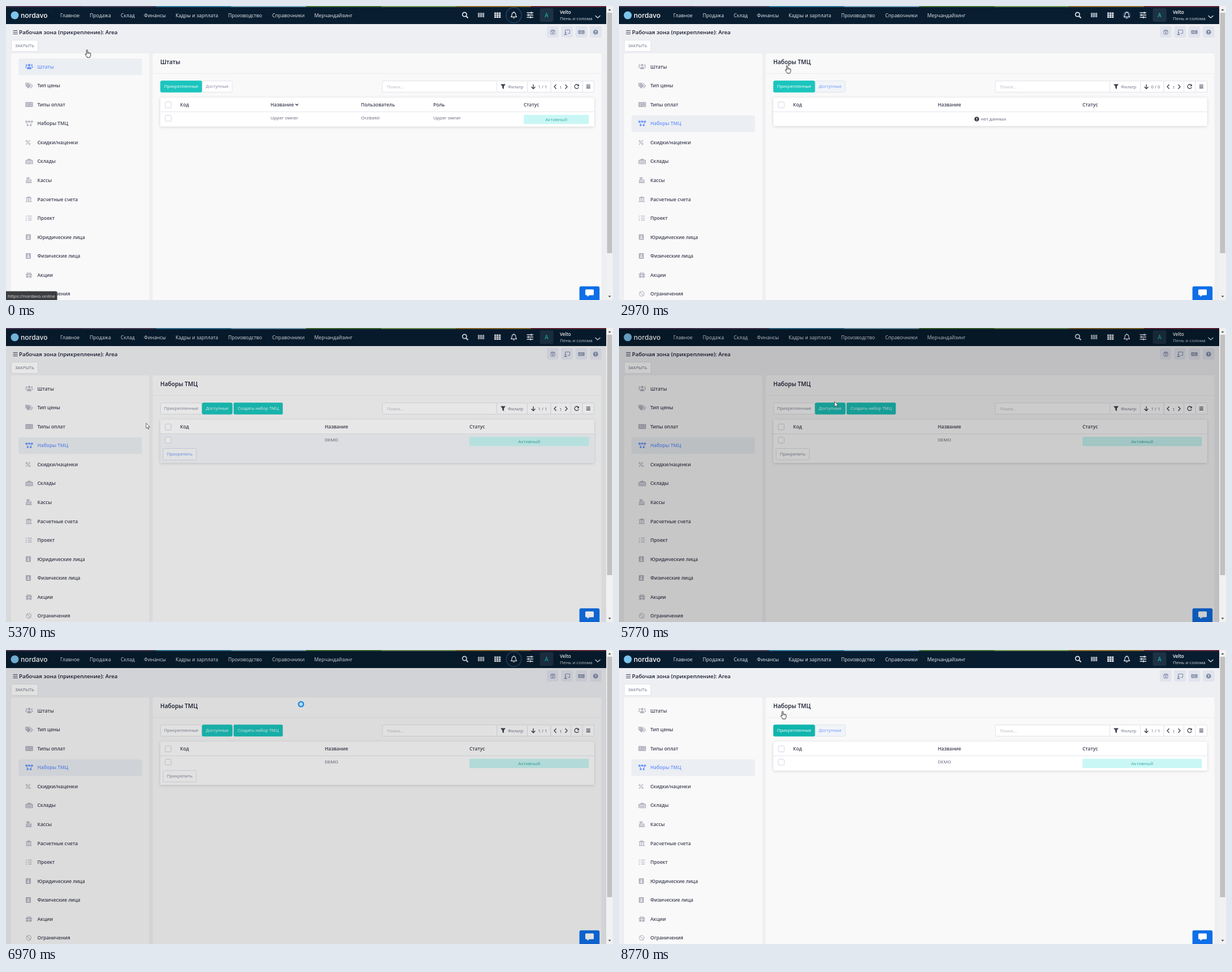
An HTML page for the animation above (8.81 s loop, 1074 by 521 pixels).

```html
<!DOCTYPE html>
<html lang="ru">
<head>
<meta charset="utf-8">
<style>
html, body { margin: 0; width: 100%; height: 100%; overflow: hidden; background: #eeeff2; }
svg { display: block; width: 1074px; height: 521px; }
text { font-family: "Open Sans", "Noto Sans", sans-serif; white-space: pre; }
</style>
</head>
<body>
<svg id="stage" viewBox="0 0 1074 521"></svg>
<script>
const LOOP = 8810;
const INK = '#3f4254', GREY = '#7e8299', BLUE = '#6993ff', TEAL = '#1bc5bd', LINE = '#e0e2e8';

const T = (x, y, s, size, fill = INK, weight = 400, anchor = 'start') =>
  `<text x="${x}" y="${y}" font-size="${size}" fill="${fill}" font-weight="${weight}" text-anchor="${anchor}">${s}</text>`;
const R = (x, y, w, h, fill, r = 0, stroke = 'none') =>
  `<rect x="${x}" y="${y}" width="${w}" height="${h}" rx="${r}" fill="${fill}" stroke="${stroke}"/>`;
const P = (d, fill = 'none', stroke = 'none', w = 1) =>
  `<path d="${d}" fill="${fill}" stroke="${stroke}" stroke-width="${w}" stroke-linejoin="round"/>`;
const C = (x, y, r, fill, stroke = 'none', w = 1) =>
  `<circle cx="${x}" cy="${y}" r="${r}" fill="${fill}" stroke="${stroke}" stroke-width="${w}"/>`;
const G = (x, y, body, color = INK) => `<g transform="translate(${x} ${y})" color="${color}">${body}</g>`;
const K = 'currentColor', PALE = '#f9f9f9';

const people = C(0, -2.7, 2.2, K) + C(-4.7, -2.6, 1.4, K) + C(4.7, -2.6, 1.4, K) +
  P('M-3.8 4.6V3Q-3.8.4-1.3.4H1.3Q3.8.4 3.8 3V4.6ZM-6.7 2V.9Q-6.7-.4-5.3-.4H-3.6Q-4.7.5-4.8 2ZM6.7 2V.9Q6.7-.4 5.3-.4H3.6Q4.7.5 4.8 2Z', K);
const book = R(-4.5, -5, 9, 10, K, 1) + C(0, -1.5, 1.3, PALE) + P('M-2.4 2.8Q-2.2.5 0 .5T2.4 2.8Z', PALE);

const items = [
  ['Штаты', people],
  ['Тип цены', P('M-6.8-4.4V0L-2.2 4.8Q-1.6 5.2-1 4.8L3 .8Q3.4.2 3 -.4L-1.6-5H-6.2ZM0-5H1.3L6.4 0Q7 .6 6.4 1.2L2.6 5 1.4 4.3 4.6.9Q5 .2 4.6-.4Z', K) + C(-4.4, -2.6, .9, PALE)],
  ['Типы оплат', R(-6.7, -4.3, 13.4, 8.8, K, 1) + P('M-4.5-1.5H-2M-4.5 1H-2M-.2 1.8H1.2M2.5 1.8H5M-.2-1.5H1.2M3-1.5H5', 'none', PALE, .8)],
  ['Наборы ТМЦ', P('M-4-3.4H4M-4.6-2L-1.6 3M4.6-2L1.6 3', 'none', K, 1) + R(-6.6, -4.8, 3.2, 3.2, K, .5) + R(-1.6, -4.8, 3.2, 3.2, K, .5) + R(3.4, -4.8, 3.2, 3.2, K, .5) + R(-4.2, 1.6, 3, 3, K, .5) + R(1.2, 1.6, 3, 3, K, .5)],
  ['Скидки/наценки', P('M-5.5 4L1.5-4', 'none', K, 1.4) + C(-4.5, -2.4, 1.3, 'none', K, 1.1) + C(.6, 2.6, 1.3, 'none', K, 1.1)],
  ['Склады', P('M-6.6 5V-1.8L0-5 6.6-1.8V5H4.6V-.8H-4.6V5Z', K) + P('M-4 .8H4M-4 2.6H4M-4 4.4H4', 'none', K, 1.2)],
  ['Кассы', P('M-5-5H1V-3H-1V-1.5H3.6L4.4 2H-6L-5-1.5H-3V-3H-5ZM-6 2.8H4.4V5H-6Z', K) + P('M-3.6-.2H2.4M-4 1.1H2.6', 'none', PALE, .6)],
  ['Расчетные счета', P('M-6-2.6L-.8-5.2 4.4-2.6V-1.6H-6ZM-6 3.4H4.4V5H-6ZM-5-1H-3.4V3H-5ZM-1.6-1H0V3H-1.6ZM1.8-1H3.4V3H1.8Z', K)],
  ['Проект', P('M-2-3.5H4.6M-2 0H4.6M-2 3.5H4.6', 'none', K, 1.3) + P('M-6.4-3.6L-5.4-2.6-3.6-4.6M-6.4 0L-5.4 1-3.6-1', 'none', K, 1) + C(-5.2, 3.5, 1, K)],
  ['Юридические лица', G(-1.5, 0, book, K)],
  ['Физические лица', G(-1.5, 0, book, K)],
  ['Акции', P('M-6-2H-1V.6H-6ZM0-2H5V.6H0ZM-5.4 1.4H-1V5H-5.4ZM0 1.4H4.4V5H0Z', K) + P('M-.5-2Q-4.5-2-3.6-4T-.5-2Q3.5-2 2.6-4T-.5-2', 'none', K, 1)],
  ['Ограничения', C(-.8, 0, 4.3, 'none', K, 1.1) + P('M-3.8-3L2.2 3', 'none', K, 1.1)],
];
const itemY = i => 107.5 + 33.55 * i;

const strip = ['#5a3f5c', '#5d4a66', '#3a86a8', '#7fb0c8', '#4a7a36', '#7da05a', '#9a742c', '#7b2f3e'];
const menu = [[96, 'Главное'], [148, 'Продажа'], [203, 'Склад'], [244, 'Финансы'], [300, 'Кадры и зарплата'],
  [393, 'Производство'], [471, 'Справочники'], [545.5, 'Мерчандайзинг']];
const burger = P('M-4-3H4M-4 0H4M-4 3H4', 'none', K, 1.2);

function navBar() {
  let s = R(0, 0, 1062, 32, '#081d30') + strip.map((c, i) => R(i * 132.75, 0, 132.75, 1.8, c)).join('');
  s += C(15.5, 16.5, 7, '#7cc4ec');
  s += `<text x="26" y="20.5" fill="#fff" font-size="12.2" font-weight="500" style="font-family:Inter,sans-serif">nordavo</text>`;
  s += menu.map(([x, m]) => T(x, 19.6, m, 8.67, '#e6e9ee', 500)).join('');
  const w = '#e4e8ee';
  s += C(811.3, 15, 3.7, 'none', w, 1.7) + P('M814 18L817.5 21.3', 'none', w, 2);
  for (let i = 0; i < 6; i++) s += R(835 + i * 2, 12, i % 2 ? 1.1 : 1.6, 8, '#b9c0ca');
  for (let i = 0; i < 9; i++) s += R(864 + i % 3 * 4, 11.5 + (i / 3 | 0) * 3.4, 3.3, 2.7, w);
  s += P('M893.5 19.3Q895.3 17.8 895.3 14.5 895.3 11.6 898.5 11.3 901.7 11.6 901.7 14.5 901.7 17.8 903.5 19.3ZM897.3 20.7Q898.5 22.3 899.7 20.7M898.5 9.8V11', 'none', w, 1.2);
  s += P('M921.5 12H933M921.5 16H933M921.5 20H933', 'none', w, 1.4) + P('M929.5 10.3V13.7M924.5 14.3V17.7M928 18.3V21.7', 'none', w, 1.7);
  s += R(944.5, 4, 24, 24, '#1d3245', 3) + T(956.5, 20, 'A', 10, TEAL, 400, 'middle');
  s += T(980, 14, 'Velto', 8, '#fff', 600) + T(980, 24.5, 'Пень и солома', 8, '#d5dae1');
  return s + P('M1042.5 17L1047 21 1051.5 17', 'none', w, 1.2);
}

function pageFrame() {
  let s = R(0, 0, 1062, 521, '#eeeff2') + navBar();
  s += G(16.5, 46.5, burger) + T(23, 50, 'Рабочая зона (прикрепление): Area', 9.75, '#181c32', 600);
  s += R(9.5, 60.5, 47, 20, '#fff', 2, LINE) + T(33, 73.4, 'ЗАКРЫТЬ', 7.5, '#6c7086', 400, 'middle');
  for (let i = 0; i < 4; i++) s += R(957 + i * 25.4, 36, 20.4, 20, '#e1e3ed', 3);
  const c = '#7f8aa5';
  s += R(964, 43, 7, 7, 'none', 1, c) + P('M964 44.5H971M967.5 46V49M966 47.5H969M966 41.5V43M969 41.5V43', 'none', c, 1);
  s += P('M989.5 46V42.5H997.5V48.5H994', 'none', c, 1) + C(990, 47, 1.3, c) + P('M987.5 51.3Q987.5 48.8 990 48.8T992.5 51.3Z', c);
  s += R(1012.5, 43, 11, 6.5, c, 1) + P('M1014 48L1015.3 44.5 1016.6 48M1019.2 45H1022M1019.2 47.5H1022M1018 43V49.5', 'none', '#e1e3ed', .8);
  s += C(1043.2, 46.2, 4.3, c) + T(1043.2, 48.8, '?', 7, '#fff', 700, 'middle');
  return s + R(9, 84, 244.5, 445, '#f9f9f9', 3) + R(259.5, 84, 794, 445, '#f9f9f9', 3) + R(259.5, 119, 794, 1, '#ededf0');
}

function sidebar(active, hover) {
  return items.map(([label, icon], i) => {
    const y = itemY(i), on = i === active || i === hover;
    return (on ? R(22, y - 14.5, 218.5, 29.5, '#ebeef2', 3) : '') +
      G(41, y, icon, on ? BLUE : '#b5b5c3') + T(55.5, y + 3.2, label, 8.45, on ? BLUE : INK, 600);
  }).join('');
}

const box = (x, y) => R(x, y, 10.6, 10.6, '#fff', 2, '#cfd5e2');

function tools(v) {
  let s = '';
  const tab = (x, w, label, on, hot) =>
    R(x + .5, 132.8, w - 1, 20, on ? (v.focus ? '#0fb5ad' : TEAL) : hot ? '#f1f4f8' : '#fff', 2, on ? (v.focus ? '#0fb5ad' : TEAL) : LINE) +
    T(x + w / 2, 145.4, label, 7.55, on ? '#fff' : hot ? BLUE : GREY, 400, 'middle');
  s += tab(273, 74, 'Прикрепленные', !v.avail, v.hot === 'attached') + tab(346.7, 54, 'Доступные', v.avail, v.hot === 'avail');
  if (v.avail) s += R(402.7, 132.3, 87, 21, TEAL, 2) + T(446.2, 145.4, 'Создать набор ТМЦ', 7.55, '#fff', 400, 'middle');
  [[666, 202.5], [868.5, 54], [922.5, 41.5], [964, 35.5], [999.5, 20.5], [1020, 20.5]].forEach(([x, w]) => s += R(x, 132.8, w, 20, '#fff', 1, LINE));
  s += T(674, 145.6, 'Поиск...', 8, '#b5b5c3');
  s += P('M875 138.6H884L880.9 142.6V147.2L878.2 145.4V142.6Z', INK) + T(888, 145.6, 'Фильтр', 7.6, '#6c7086');
  s += P('M933 139V146.5M929.6 143.3L933 146.7 936.4 143.3', 'none', INK, 1.4);
  s += T(949.5, 145.6, v.rows ? '1 / 1' : '0 / 0', 7.8, '#5e6278', 400, 'middle');
  s += P('M973.5 139.3L970 143 973.5 146.7M989.5 139.3L993 143 989.5 146.7', 'none', INK, 1.4) + T(981.5, 146.8, '1', 8, '#5e6278', 400, 'middle');
  s += P('M1012.8 140.6A3.7 3.7 0 1 0 1013.2 144', 'none', INK, 1.3) + P('M1013.9 138.6V142.2H1010.3Z', INK);
  return s + G(1030.3, 142.8, P('M-3.5-2.6H3.5M-3.5 0H3.5M-3.5 2.6H3.5', 'none', K, 1.2));
}

function table(v) {
  const h = v.open ? 76.5 : v.rows ? 51 : 50;
  let s = `<g filter="url(#shade)">${R(273, 162.5, 767.5, h, '#fff', 2)}</g>`;
  if (v.rowHot) s += R(273, 188, 767.5, h - 25.5, '#f3f5f8');
  s += R(273, 187, 767.5, 1, '#e4e6ee') + box(281.7, 170);
  const head = v.staff
    ? [[308, 'Код'], [468, 'Название'], [628, 'Пользователь'], [756, 'Роль'], [916, 'Статус']]
    : [[308, 'Код'], [564, 'Название'], [820, 'Статус']];
  s += head.map(([x, w]) => T(x, 178, w, 8.4, INK, 600)).join('');
  if (v.staff) s += P('M512.3 173.4L514.6 175.9 516.9 173.4', 'none', INK, 1.5);
  if (!v.rows) return s + C(633, 200.4, 4.2, '#3a3d4e') + R(632.4, 198, 1.3, 3, '#fff') + R(632.4, 201.8, 1.3, 1.2, '#fff') + T(640, 203.4, 'нет данных', 8, '#5e6278');
  const cells = v.staff ? [[468, 'Upper owner'], [628, 'Orzibekil'], [756, 'Upper owner']] : [[564, 'DEMO']];
  s += box(281.7, 193.5) + cells.map(([x, w]) => T(x, 201.3, w, 8, '#5e6278')).join('');
  const bx = v.staff ? 916 : 820;
  s += R(bx, 192.7, 1031.3 - bx, 16.6, '#c9f7f5', 2) + T((bx + 1031.3) / 2, 204.2, 'Активный', 8, '#3aada6', 400, 'middle');
  if (v.open) {
    const hot = v.hot === 'attach';
    s += R(277.8, 213.5, 59, 20.4, hot ? '#f8f9fb' : '#fff', 2, hot ? '#d5dae8' : LINE) + T(307.3, 226.4, 'Прикрепить', 7.55, hot ? BLUE : GREY, 400, 'middle');
  }
  return s;
}

const chat = R(1014.6, 496.7, 35.6, 28, '#0f6fe8', 3) + P('M1026.5 502.3H1038.5Q1040 502.3 1040 503.8V511Q1040 512.5 1038.5 512.5H1032.5L1028.5 515.3V512.5H1026.5Q1025 512.5 1025 511V503.8Q1025 502.3 1026.5 502.3Z', '#fff');
const scrollBar = R(1062, 0, 12, 521, '#f1f1f1') + R(1063.5, 12, 9, 426, '#c1c1c1') +
  P('M1065.5 8L1068 5 1070.5 8Z', '#505050') + P('M1065.5 513.5L1068 516.5 1070.5 513.5Z', '#505050');
const tip = R(-3, 505.5, 93.5, 20, '#3b3d40', 2) + T(3, 516.6, 'https://nordavo.online', 8, '#e3e4e6');
const pointers = {
  hand: P('M-2.6 2V-5.2Q-2.6-6.4-1.6-6.4T-.6-5.2V-1.5Q.6-2.2 1.2-1.2 2.4-1.8 3-.7 4.8-1.1 4.8.5V3Q4.8 5 3.6 6.2V7.2H-1.6V6.2L-4.6 2.4Q-5.3 1.2-4.3.8-3.5.6-2.6 2Z', '#fff', '#222', .9) + P('M-.6-1.5V1M1.2-1.2V1M3-.7V1.2', 'none', '#222', .6),
  arrow: P('M-3-5.3V3.8L-.9 1.9.7 5.4 2 4.8.5 1.4H3.4Z', '#fff', '#333', .7),
  wait: C(0, 0, 4.4, '#b9d9f2', '#1f8be0', 2.4),
};

const stage = document.getElementById('stage');
stage.innerHTML = `<defs><filter id="shade" x="-5%" y="-30%" width="110%" height="170%"><feDropShadow dx="0" dy="1" stdDeviation="2.4" flood-color="#000" flood-opacity=".16"/></filter></defs>
${pageFrame()}<circle id="ring" cx="898.5" cy="16.2" fill="none" stroke="#6488d0"/><g id="view"></g>${chat}
<rect id="dim" width="1062" height="521" fill="#000"/>${scrollBar}<g id="tip">${tip}</g><g id="pointer"></g>`;
const [ring, view, dim, tipBox, pointer] = ['ring', 'view', 'dim', 'tip', 'pointer'].map(id => document.getElementById(id));

// pointer path: time, x, y
const path = [[0, 145, 84], [70, 145, 84], [830, 76, 192], [1130, 76, 192], [1400, 75, 165], [1850, 75, 165], [2800, 299, 112],
  [3400, 299, 112], [4250, 252, 186], [4300, 252, 186], [4550, 253, 158], [4700, 253, 158], [5000, 251, 174], [5400, 251, 174],
  [6150, 522, 96], [7030, 522, 96], [7330, 394, 128], [7880, 235, 114], [8200, 235, 114], [8600, 291, 115], [LOOP, 291, 115]];

function pointerAt(t) {
  const i = path.findIndex(k => k[0] > t);
  const [a, b] = [path[i - 1], path[i]];
  const u = (t - a[0]) / (b[0] - a[0]), e = u * u * (3 - 2 * u);
  return [a[1] + (b[1] - a[1]) * e, a[2] + (b[2] - a[2]) * e];
}

function hitTest(x, y, avail, open) {
  const inside = (l, t, r, b) => x >= l && x <= r && y >= t && y <= b;
  const item = items.findIndex((_, i) => inside(22, itemY(i) - 15, 240, itemY(i) + 15));
  if (item >= 0) return item;
  if (inside(273, 132, 346.5, 153)) return 'attached';
  if (inside(346.5, 132, 400.5, 153)) return 'avail';
  if (avail && inside(403, 132, 496, 162)) return 'create';
  if (open && inside(277, 213, 337, 234)) return 'attach';
  return -1;
}

function setHTML(el, s) {
  if (el.last !== s) el.innerHTML = el.last = s;
}

function draw(t) {
  const blocked = t >= 5430 && t < 7000;
  const [px, py] = pointerAt(t), x = px * 1.25, y = py * 1.25;
  const v = {
    staff: t < 1700,
    avail: t >= 3150 && t < 8200,
    rows: t < 1700 || t >= 3150 && t < 7000 || t >= 8200,
    open: t >= 4650 && t < 7000,
    focus: t >= 8200,
  };
  v.hot = blocked ? -1 : hitTest(x, y, v.avail, v.open);
  v.rowHot = !blocked && v.rows && x > 273 && x < 1040 && y > 188 && y < (v.open ? 238 : 213);
  setHTML(view, sidebar(t < 1600 ? 0 : 3, v.hot) +
    T(273, 103.4, v.staff ? 'Штаты' : 'Наборы ТМЦ', 10.2, '#181c32', 600) + tools(v) + table(v));

  const overlaid = t >= 5300 && t <= 7000;
  const kind = t >= 6250 && t < 7030 ? 'wait' : v.hot !== -1 && !overlaid ? 'hand' : 'arrow';
  setHTML(pointer, pointers[kind]);
  pointer.setAttribute('transform', `translate(${px.toFixed(2)} ${py.toFixed(2)})`);

  dim.setAttribute('opacity', .2 * Math.max(0, Math.min(1, (t - 5300) / 150, (7030 - t) / 100)));
  tipBox.setAttribute('opacity', Math.max(0, Math.min(1, (2600 - t) / 150)));

  // bell pulse: every 3.5 s, visible for 1.4 s
  const easeOut = u => 1 - (1 - u) ** 1.7;
  const p = (t + 800) % 3500, u = Math.min(1, p / 1400), scale = .1 + 1.1 * easeOut(u);
  ring.setAttribute('r', 14.4 * scale);
  ring.setAttribute('stroke-width', 1.8 * scale);
  ring.setAttribute('opacity', p >= 1400 ? 0 : p < 175 ? p / 175 : 1 - easeOut((p - 175) / 1225));
}

const start = performance.now();
function tick() {
  draw((performance.now() - start) % LOOP);
  requestAnimationFrame(tick);
}
tick();
</script>
</body>
</html>
```
